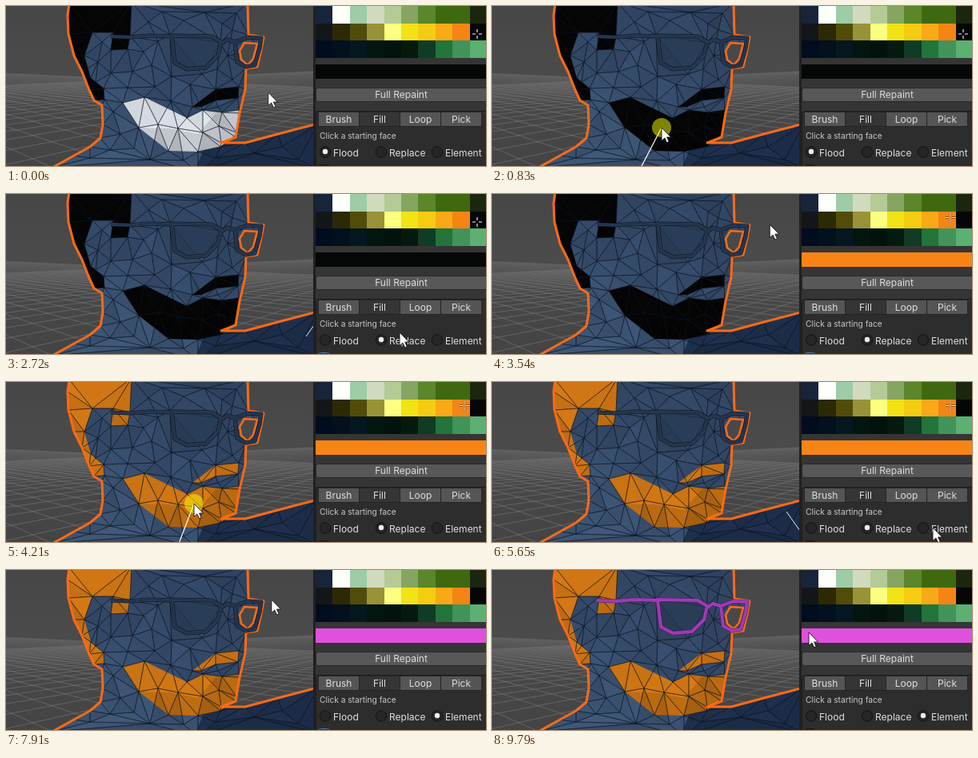
Write an HTML page that moves like this. It is 600 by 200 pixels and loops after 9.86 s.

```html
<!DOCTYPE html>
<html lang="en">
<head>
<meta charset="utf-8">
<title>Mesh fill modes</title>
<style>
html, body { margin: 0; width: 100%; height: 100%; overflow: hidden; background: #474747; }
svg { display: block; width: 600px; height: 200px; }
text { font: 12px Inter, Roboto, sans-serif; fill: #dedede; }
.mid { text-anchor: middle; }
</style>
</head>
<body>
<svg id="stage" viewBox="0 0 600 200">
  <defs>
    <linearGradient id="back" x2="0" y2="1">
      <stop stop-color="#464646"/><stop offset=".38" stop-color="#4b4b4b"/><stop offset="1" stop-color="#444"/>
    </linearGradient>
    <linearGradient id="fade" gradientUnits="userSpaceOnUse" x1="0" y1="76" x2="0" y2="200">
      <stop stop-color="#999" stop-opacity=".08"/><stop offset=".3" stop-color="#999" stop-opacity=".4"/>
      <stop offset="1" stop-color="#999" stop-opacity=".45"/>
    </linearGradient>
    <linearGradient id="skin" gradientUnits="userSpaceOnUse" x1="250" y1="0" x2="130" y2="180">
      <stop stop-color="#334866"/><stop offset=".5" stop-color="#384f70"/><stop offset="1" stop-color="#405979"/>
    </linearGradient>
    <clipPath id="view"><rect width="384" height="200"/></clipPath>
    <clipPath id="inside"><polygon id="clipShape"/></clipPath>
  </defs>
  <g clip-path="url(#view)">
    <rect width="384" height="200" fill="url(#back)"/>
    <g id="grid" stroke="url(#fade)" stroke-width=".8"></g>
    <polygon id="body" fill="url(#skin)"/>
    <g clip-path="url(#inside)">
      <polygon points="238,202 246,181 268,176 272,169 300,170 390,145 390,204" fill="#1f304e"/>
      <polygon id="hair"/><polygon id="beard"/>
      <polygon points="166,152 204,153 240,160 262,134 291,130 288,160 268,176 240,182 203,181" opacity=".13"/>
      <polygon id="stache"/>
      <g id="mesh" stroke="#0d1521" stroke-opacity=".65" stroke-width=".7" stroke-linejoin="round"></g>
    </g>
    <polygon id="edge" fill="none" stroke="#ff6a14" stroke-width="3" stroke-linejoin="round"/>
    <polygon points="208,39 257,40 267,47 263,61 249,76 227,78 213,70" fill="#26374f" opacity=".65"/>
    <polygon points="292,56 298,46 314,47 309,66 302,74 294,67" fill="#484848" stroke="#ff6a14" stroke-width="2.6" stroke-linejoin="round"/>
    <g id="glasses" fill="none" stroke-linejoin="round"></g>
    <path id="stale" fill="none" stroke="#eee" stroke-width="1"/>
    <g id="brush">
      <line id="normal" stroke="#fff" stroke-width="1.2"/>
      <circle id="disc" r="12" fill="#ff0" fill-opacity=".5"/>
    </g>
  </g>
  <g id="panel">
    <rect x="384" width="216" height="200" fill="#353535"/>
    <rect x="384" width="3" height="200" fill="#202020"/>
  </g>
  <path id="arrow" d="M0 0V16.5L3.9 13 6.6 18.8 9.2 17.6 6.6 12H11.6Z" fill="#fff" stroke="#111" stroke-width=".9"/>
</svg>
<script>
const LOOP = 9860;
const $ = id => document.getElementById(id);
function add(parent, tag, attrs, label) {
  const el = document.createElementNS('http://www.w3.org/2000/svg', tag);
  set(el, attrs);
  if (label) el.textContent = label;
  parent.appendChild(el);
  return el;
}
function set(el, attrs) {
  for (const k in attrs) el.setAttribute(k, attrs[k]);
}
const parse = s => s.split(' ').map(p => p.split(',').map(Number));

// Outlines of the model and its painted regions
const shape = {
  body: '79,-3 77,12 78,35 85,62 95,82 104,105 110,118 120,124 121,148 118,165 105,176 85,187 58,202 ' +
    '240,208 390,204 390,147 340,160 299,171 269,171 287,164 288,158 292,134 299,104 300,78 314,76 319,55 322,39 303,36 302,-4',
  hair: '79,-3 157,-5 155,38 152,54 131,55 134,33 108,33 98,62 106,90 122,103 123,117 110,118 104,105 95,82 85,62 78,35 77,12',
  beard: '146,121 173,114 226,140 246,130 270,133 291,130 288,160 268,176 240,182 203,181 166,152',
  stache: '233,126 262,104 291,101 290,115 262,118 244,126'
};
for (const id in shape) set($(id), { points: shape[id] });
set($('edge'), { points: shape.body });
set($('clipShape'), { points: shape.body });

const inner = '178,20 195,7 222,18 248,8 270,22 288,9 283,30 172,57 190,44 158,82 182,74 207,88 230,98 245,85 ' +
  '264,79 283,92 277,62 206,119 186,101 152,102 131,84 115,70 134,132 143,160 130,180 160,178 180,192 105,190 ' +
  '215,153 246,158 266,150 190,148 265,126 120,45 112,95 262,190 310,184 345,176 366,192 222,193 205,36 268,46';

// Bowyer-Watson triangulation
function triangulate(pts) {
  const n = pts.length;
  const p = [...pts, [-2000, -2100], [3000, -2000], [300, 4000]];
  const holds = ([a, b, c], [x, y]) => {
    const [ax, ay] = p[a];
    const bx = p[b][0] - ax, by = p[b][1] - ay, cx = p[c][0] - ax, cy = p[c][1] - ay;
    const d = 2 * (bx * cy - by * cx), b2 = bx * bx + by * by, c2 = cx * cx + cy * cy;
    const ux = (cy * b2 - by * c2) / d, uy = (bx * c2 - cx * b2) / d;
    return (x - ax - ux) ** 2 + (y - ay - uy) ** 2 < ux * ux + uy * uy;
  };
  let tris = [[n, n + 1, n + 2]];
  pts.forEach((pt, i) => {
    const rim = new Map();
    tris = tris.filter(t => {
      if (!holds(t, pt)) return true;
      t.forEach((a, k) => {
        const b = t[(k + 1) % 3], key = Math.min(a, b) + '-' + Math.max(a, b);
        rim.has(key) ? rim.delete(key) : rim.set(key, [a, b]);
      });
      return false;
    });
    rim.forEach(([a, b]) => tris.push([a, b, i]));
  });
  return tris.filter(t => t.every(v => v < n));
}
const names = new Set([...Object.values(shape), inner].join(' ').split(' '));
const points = parse([...names].join(' '));
triangulate(points).forEach((t, i) => {
  const shade = ((i * 37 + 11) % 17) / 17 * .14;
  add($('mesh'), 'polygon', { points: t.map(v => points[v]).join(' '), 'fill-opacity': shade });
});

// Floor grid from two vanishing points
for (let i = -30; i <= 30; i++) {
  add($('grid'), 'line', { x1: -230, y1: 74, x2: -230 + i * 95, y2: 200.5 });
  add($('grid'), 'line', { x1: 560, y1: 74, x2: 560 + i * 95, y2: 200.5 });
}

const frame = 'M131 38L155 39 180 37 207 38M207 37L257 38 269 45 265 62 250 77 226 79 211 71ZM268 48L276 42 286 45' +
  'M286 45L302 39 319 40 317 53 311 74 300 76 289 70Z';
const dark = add($('glasses'), 'path', { d: frame, stroke: '#0c121c', 'stroke-width': 5 });
const rim = add($('glasses'), 'path', { d: frame, 'stroke-width': 3.4 });
const wire = add($('glasses'), 'path', { d: frame, 'stroke-width': .7 });

// Inspector panel
const panel = $('panel');
const rect = (x, y, width, height, fill, more) => add(panel, 'rect', { x, y, width, height, fill, ...more });
const label = (x, y, str, more) => add(panel, 'text', { x, y, ...more }, str);
rect(387, 0, 213, 65, '#282828');
[
  '17243a fdfffa 9dcca7 d1dabd b4cb96 86a560 5b8629 40690f 40690f 1b260f',
  '131619 2c2a05 514c09 989239 fcff80 f1e315 f4cc12 f9a916 f48515 060606',
  '010c1e 03101d 05171f 03150f 02120c 05190f 103b25 22743b 42935a 5bb072'
].forEach((row, r) => row.split(' ').forEach((c, i) => {
  const x = Math.round(387 + i * 21.4);
  rect(x, r ? r * 21.5 : 0, Math.round(387 + (i + 1) * 21.4) - x, 21.5, '#' + c, { 'shape-rendering': 'crispEdges' });
}));
const bar = rect(387, 73, 213, 18);
rect(387.5, 102.5, 220, 17, '#585858', { rx: 3, stroke: '#282828' });
label(494, 115.3, 'Full Repaint', { class: 'mid' });
rect(387.5, 131.5, 220, 80, '#2d2d2d', { rx: 3, stroke: '#1e1e1e' });
['Brush', 'Fill', 'Loop', 'Pick'].forEach((s, i) => {
  rect(390.5 + i * 51, 132.5, 51, 18, i === 1 ? '#353535' : '#555', { stroke: '#252525' });
  label(416 + i * 51, 146, s, { class: 'mid' });
});
label(392, 166, 'Click a starting face', { style: 'font-size:10.2px;fill:#c8c8c8' });
const dots = ['Flood', 'Replace', 'Element'].map((s, i) => {
  const cx = 399 + i * 70;
  add(panel, 'circle', { cx, cy: 182.5, r: 6.7, fill: '#262626', stroke: '#121212' });
  label(cx + 10, 188, s);
  return add(panel, 'circle', { cx, cy: 182, r: 3.2, fill: '#eee' });
});
const check = rect(391.5, 198.5, 12, 12, '#252525', { rx: 2 });
const cross = add(panel, 'g', {});
const ticks = 'M-6 0H-2M2 0H6M0 -6V-2M0 2V6';
add(cross, 'path', { d: ticks, stroke: '#000', 'stroke-width': 2.4, opacity: .55 });
add(cross, 'path', { d: ticks, stroke: '#fff', 'stroke-width': 1.1 });

// Pointer path: time, x, y and, over the model, the brush normal
const keys = [
  [0, 328, 108], [190, 291, 124, -38, 80], [500, 212, 152, -26, 50], [1250, 212, 152, -26, 50],
  [1400, 260, 146, -30, 60], [1620, 384, 166], [1860, 487, 182],
  [2700, 487, 182], [3060, 573, 29], [3240, 573, 29], [3600, 303, 40, -33, 95], [3680, 291, 42, -33, 95],
  [3950, 235, 152, -19, 50], [4970, 235, 152, -19, 50], [5110, 270, 150, -25, 55], [5330, 384, 166], [5640, 551, 182],
  [5800, 551, 182], [5990, 547, 182], [6270, 547, 182], [6520, 530, -26],
  [7500, 398, -26], [7580, 387, 3], [7910, 332, 37], [8010, 319, 45, -60, 148],
  [8120, 312, 52, -94, 103], [8370, 312, 52, -94, 103], [8450, 312, 52, -15, 103],
  [9590, 312, 52, -15, 103], [9640, 328, 57], [9780, 396, 78], [LOOP, 396, 78]
];
function pointer(t) {
  const i = Math.max(1, keys.findIndex(k => k[0] > t));
  const a = keys[i - 1], b = keys[i];
  const u = (t - a[0]) / (b[0] - a[0]);
  const mix = k => a[k] + ((b[k] ?? a[k]) - a[k]) * u;
  return { x: mix(1), y: mix(2), over: a.length > 3, nx: mix(3), ny: mix(4) };
}
const show = (el, on) => set(el, { visibility: on ? 'visible' : 'hidden' });
const within = (t, a, b) => t >= a && t < b;

function draw(t) {
  const p = pointer(t);
  set($('arrow'), { transform: `translate(${p.x} ${p.y})` });
  show($('brush'), p.over);
  if (p.over) {
    set($('normal'), { x1: p.x, y1: p.y, x2: p.x + p.nx, y2: p.y + p.ny });
    set($('disc'), { cx: p.x, cy: p.y });
  }

  const recolored = t >= 4210, pink = t >= 8720;
  const hair = recolored ? '#d77a15' : '#050505';
  set($('hair'), { fill: hair });
  set($('stache'), { fill: hair });
  set($('beard'), { fill: recolored ? '#db7d15' : t < 760 ? '#e5eaf2' : '#050505' });
  set(dark, { stroke: pink ? '#5a1c6c' : '#0c121c' });
  set(rim, { stroke: pink ? '#ae43c6' : '#2e4260' });
  set(wire, { stroke: pink ? '#7c2b91' : '#111a28' });

  const first = within(t, 1620, 3500), second = within(t, 5330, 6190);
  show($('stale'), first || second);
  set($('stale'), { d: first ? 'M385 164L375 178' : 'M368 162L385 186' });

  const mode = t < 2190 ? 0 : t < 6190 ? 1 : 2;
  dots.forEach((d, i) => show(d, i === mode));
  const focus = within(t, 2190, 4210) || within(t, 6190, 8720);
  set(check, { stroke: focus ? '#4b7fb5' : '#151515' });
  set(bar, { fill: t < 3150 ? '#060707' : t < 7250 ? '#f98416' : '#df50de' });
  show(cross, t < 7250);
  set(cross, { transform: t < 3150 ? 'translate(589 35)' : 'translate(573 29.5)' });
}
const start = performance.now();
function tick() {
  draw((performance.now() - start) % LOOP);
  requestAnimationFrame(tick);
}
tick();
</script>
</body>
</html>
```
